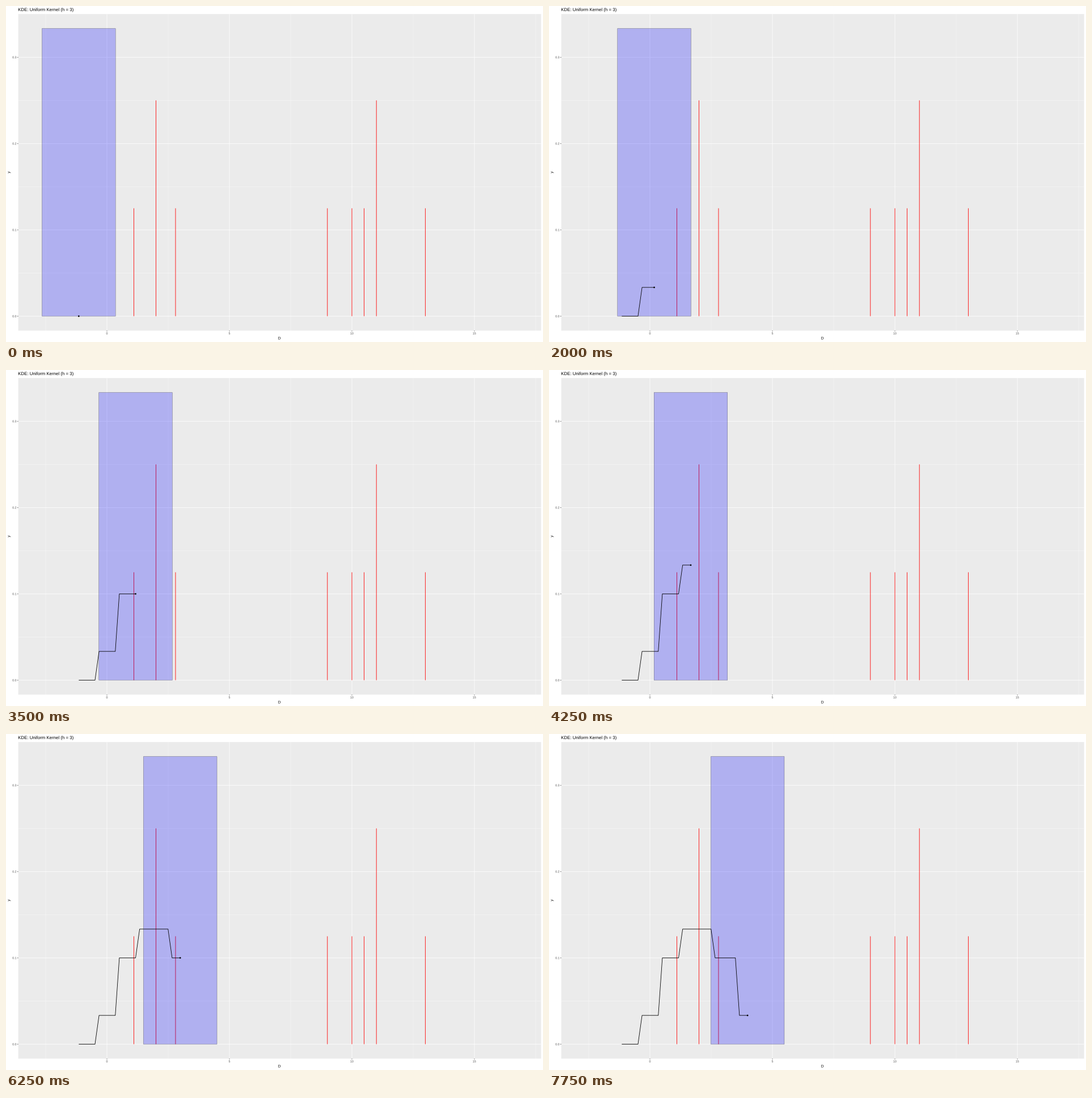
Write a matplotlib script that moves like this. It is 947x592 px and loops after 8 s.

```python
import numpy as np
import matplotlib.pyplot as plt
from matplotlib.animation import FuncAnimation
from matplotlib.patches import Circle, PathPatch, Rectangle
from matplotlib.textpath import TextPath
from matplotlib.transforms import Affine2D

W, H, DPI = 947, 592, 64
FRAMES, INTERVAL = 32, 250
PT = 72 / DPI  # points per pixel

# Data and the uniform kernel estimate
DATA = np.array([1.1, 2, 2, 2.8, 9, 10, 10.5, 11, 11, 13])
BAND = 3
centers = np.linspace(-1.15, 15.25, 100)
inside = np.abs(centers[:, None] - DATA) <= BAND / 2
density = inside.sum(axis=1) / (len(DATA) * BAND)

LEFT, RIGHT, TOP, BOTTOM = 21.6, 943.6, 14.25, 571.85


def px(x):
    return 178 + 43.2 * x


def py(y):
    return 546.5 - 1520.7 * y


fig = plt.figure(figsize=(W / DPI, H / DPI), dpi=DPI, facecolor="white")
ax = fig.add_axes([0, 0, 1, 1])
ax.set_xlim(0, W)
ax.set_ylim(H, 0)
ax.axis("off")


def line(xs, ys, color, width, z):
    art, = ax.plot(xs, ys, color=color, lw=width * PT, zorder=z, snap=False,
                   solid_capstyle="butt", solid_joinstyle="round")
    return art


def label(text, x, y, size, color="black", align=0.5, turn=0):
    """Draw text with its baseline at y; align is the share left of x."""
    path = TextPath((0, 0), text, size=size, prop={"family": "Liberation Sans"})
    box = path.get_extents()
    shift = -align * (box.x0 + box.x1)
    move = Affine2D().translate(shift, 0).scale(1, -1).rotate_deg(turn).translate(x, y)
    ax.add_patch(PathPatch(move.transform_path(path), fc=color, lw=0,
                           zorder=6, snap=False))


def grid_x(x, width):
    line([px(x)] * 2, [TOP, BOTTOM], "white", width, 1)


def grid_y(y, width):
    line([LEFT, RIGHT], [py(y)] * 2, "white", width, 1)


# Panel, grid and axes
ax.add_patch(Rectangle((LEFT, TOP), RIGHT - LEFT, BOTTOM - TOP,
                       fc="#ebebeb", lw=0, zorder=0, snap=False))
for x in np.arange(-2.5, 18, 5):
    grid_x(x, 0.4)
for y in (0.05, 0.15, 0.25):
    grid_y(y, 0.4)
for x in (0, 5, 10, 15):
    grid_x(x, 0.8)
    line([px(x)] * 2, [BOTTOM, BOTTOM + 1.65], "#333333", 0.7, 2)
    label(str(x), px(x), 578.6, 5.25, "#4d4d4d")
for y in (0, 0.1, 0.2, 0.3):
    grid_y(y, 0.8)
    line([LEFT - 1.65, LEFT], [py(y)] * 2, "#333333", 0.7, 2)
    label(f"{y:.1f}", 14.8, py(y) + 1.9, 5.25, "#4d4d4d")

label("KDE: Uniform Kernel (h = 3)", LEFT - 0.4, 9, 7.86, align=0)
label("D", 482.3, 587.4, 6.55)
label("y", 6.9, 293, 6.55, turn=-90)

# One spike per distinct value
for x, n in zip(*np.unique(DATA, return_counts=True)):
    line([px(x)] * 2, [py(n / 8), py(0)], "red", 0.85, 2)

# Moving parts
left, top = px(0), py(1 / BAND)
size = px(BAND) - px(0), py(0) - top
window = Rectangle((left, top), *size, fc=(0, 0, 1, 0.25), ec="none",
                   zorder=3, snap=False)
border = Rectangle((left, top), *size, fc="none", ec=(0, 0, 0, 0.8),
                   lw=0.3 * PT, zorder=3, snap=False)
dot = Circle((0, 0), 1.35, fc="black", lw=0, zorder=5, snap=False)
for patch in (window, border, dot):
    ax.add_patch(patch)
curve = line([], [], "black", 0.85, 4)


def update(i):
    x = px(centers[i] - BAND / 2)
    window.set_x(x)
    border.set_x(x)
    curve.set_data(px(centers[:i + 1]), py(density[:i + 1]))
    dot.center = px(centers[i]), py(density[i])
    return window, border, curve, dot


anim = FuncAnimation(fig, update, frames=FRAMES, interval=INTERVAL,
                     repeat=True, repeat_delay=0)
plt.show()
```
